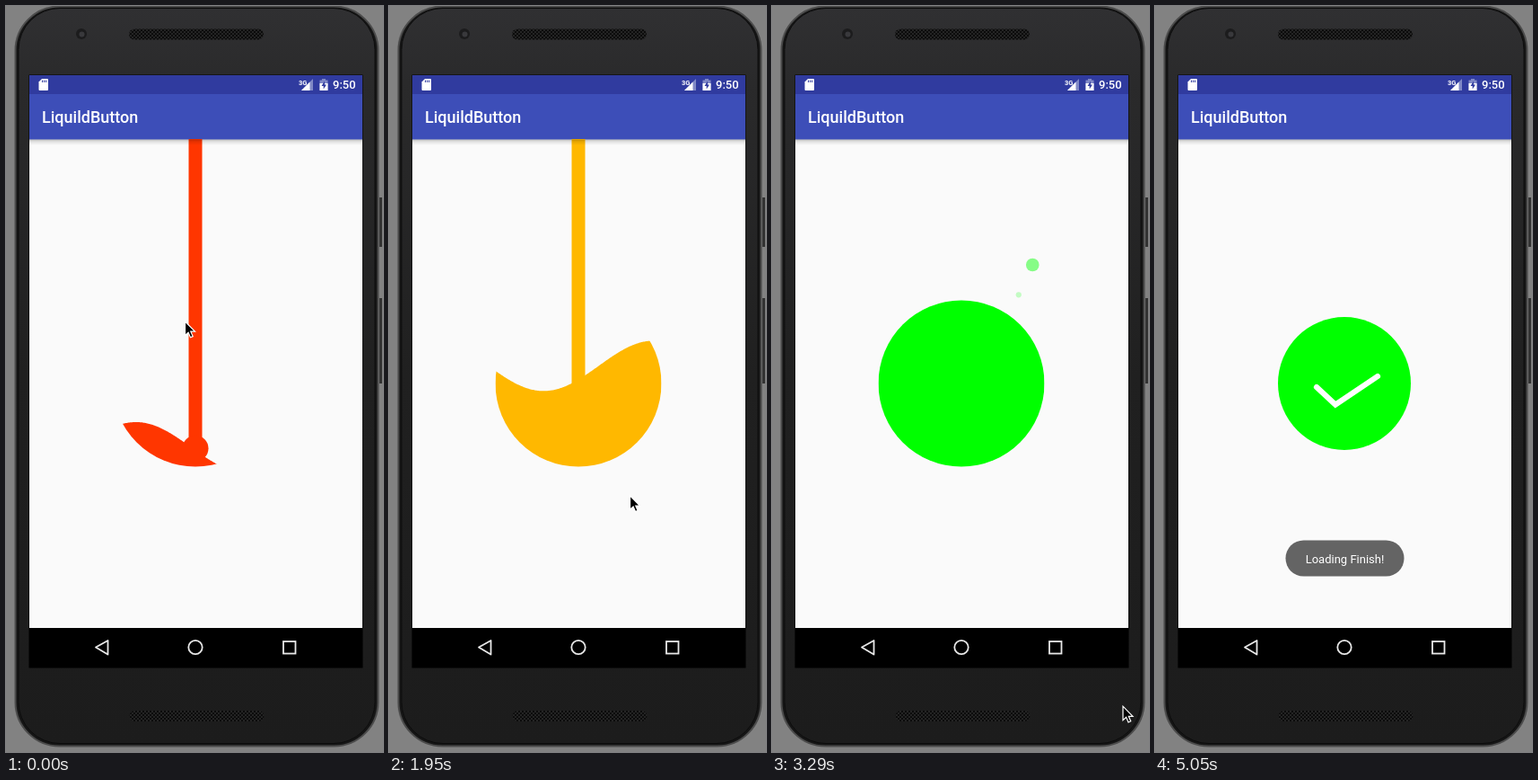
Animation of 420 by 830 pixels, one loop 6.14 s. Source, as an HTML page with a canvas:

```html
<!DOCTYPE html>
<html>
<head>
<meta charset="utf-8">
<style>
html, body { margin: 0; width: 420px; height: 830px; overflow: hidden; background: #828282; }
svg, canvas { position: absolute; left: 0; top: 0; }
text { font-family: Roboto, sans-serif; fill: #fff; }
</style>
</head>
<body>
<svg width="420" height="830">
  <defs>
    <linearGradient id="body" x2="0" y2="1">
      <stop offset="0" stop-color="#303032"/>
      <stop offset=".1" stop-color="#2a2a2b"/>
      <stop offset=".5" stop-color="#202020"/>
      <stop offset="1" stop-color="#1c1c1c"/>
    </linearGradient>
    <pattern id="mesh" width="4" height="4" patternUnits="userSpaceOnUse">
      <rect width="4" height="4" fill="#242424"/>
      <circle cx="1" cy="1" r="1.1" fill="#080808"/>
      <circle cx="3" cy="3" r="1.1" fill="#080808"/>
    </pattern>
  </defs>

  <path d="M417.5 213V268M417.5 325V420" stroke="#333" stroke-width="3"/>
  <rect x="10.5" y=".5" width="404" height="823" rx="49" fill="#161616" stroke="#4c4c4c" stroke-width="2"/>
  <rect x="14" y="2.5" width="397" height="818" rx="46" fill="url(#body)" stroke="#0c0c0c"/>
  <circle cx="84" cy="31" r="6" fill="#1c1c1d"/>
  <circle cx="84.5" cy="31.5" r="3" fill="#39393c"/>
  <rect x="137" y="25.5" width="150" height="12" rx="6" fill="url(#mesh)"/>
  <rect x="137.5" y="784" width="150" height="12" rx="6" fill="url(#mesh)"/>

  <rect x="25.5" y="76.5" width="372" height="660"/>
  <rect x="26" y="148" width="371" height="544" fill="#fafafa"/>
  <rect x="26" y="77" width="371" height="21" fill="#303b9f"/>
  <rect x="26" y="98" width="371" height="50.5" fill="#3d4eb8"/>
  <text x="40" y="130" font-size="18" font-weight="500">LiquildButton</text>

  <path d="M40 81H46Q47 81 47 82V93Q47 94 46 94H37.500Q36.500 94 36.500 93V84.500Z" fill="#fff"/>
  <path d="M40.500 82.500v2.500M42.500 82.500v2.500M44.500 82.500v2.500" stroke="#303b9f"/>
  <text x="326" y="87.500" font-size="7.500" font-weight="700">3G</text>
  <path d="M329 94L342 81V94Z" fill="#8089c6"/>
  <path d="M329 94L338.500 84.500V94Z" fill="#fff"/>
  <path d="M349.500 82.500H352V81H356V82.500H358.500V94H349.500Z" fill="#8089c6"/>
  <path d="M349.500 86H358.500V94H349.500Z" fill="#fff"/>
  <path d="M355 83.500L351.500 89H353.700V92.500L357 87.500H355Z" fill="#303b9f"/>
  <text x="364" y="92" font-size="13" font-weight="500">9:50</text>

  <g fill="none" stroke="#e8e8e8" stroke-width="1.800">
    <path d="M100 713.500L113.500 706V721.500Z" stroke-linejoin="round"/>
    <circle cx="211" cy="713.500" r="7.700"/>
    <rect x="309" y="707" width="13.500" height="13.500"/>
  </g>

  <g id="toast" opacity="0">
    <rect x="145.500" y="594.500" width="132" height="40" rx="20" fill="#646464"/>
    <text x="211.500" y="620" font-size="13" text-anchor="middle">Loading Finish!</text>
  </g>
</svg>
<canvas id="stage" width="420" height="830"></canvas>

<script>
const LOOP = 6140, CX = 211, CY = 420, FULL = 92.5, SMALL = 74;
const ctx = document.getElementById('stage').getContext('2d');
const toast = document.getElementById('toast');
const clamp = v => Math.min(1, Math.max(0, v));
const ramp = (t, a, b) => clamp((t - a) / (b - a));

// Linear interpolation through rows of [time, value, ...]
function track(rows, t) {
  let i = 1;
  while (i < rows.length - 1 && rows[i][0] < t) i++;
  const a = rows[i - 1], b = rows[i], k = ramp(t, a[0], b[0]);
  return a.slice(1).map((v, j) => v + (b[j + 1] - v) * k);
}

const pointerPath = [
  [100, 199.5, 351], [650, 226, 396], [1260, 257, 504.5], [2040, 270, 550],
  [2580, 273, 558], [2670, 324, 628], [2900, 391, 779], [3290, 391, 779],
  [3720, 391.5, 826], [3900, 391.5, 832]
];
// start time, x, y, horizontal speed, upward speed, radius
const bubbles = [
  [1980, 187, 400, -.05, .23, 8],
  [2630, 228.5, 348, .07, .23, 3.6],
  [2950, 266.4, 333.7, .07, .232, 7.6],
  [3300, 271.6, 342, .0355, .262, 14.5],
  [3320, 270, 329, .06, .262, 3.7],
  [3470, 221.5, 345.5, 0, .23, 2.5],
  [3400, 157, 350, -.05, .23, 2]
];

const level = t => 491 - .03626 * t - 5.23e-6 * t * t;

function disc(x, y, r) {
  ctx.beginPath();
  ctx.arc(x, y, r, 0, 7);
  ctx.fill();
}

function liquidColor(t) {
  const early = (528.6 - level(Math.min(t, 2580))) / 355;
  const u = t < 2580 ? early : track([[2580, early], [3030, .86], [3190, 1]], t)[0];
  const channel = v => Math.round(255 * clamp(v));
  return `rgb(${channel(2 - 2 * u)},${channel(2 * u)},0)`;
}

function drawBubbles(t) {
  const life = 800;
  for (const [start, x, y, vx, vy, r] of bubbles) {
    const age = t - start, q = age / life;
    if (q < 0 || q > 1) continue;
    ctx.globalAlpha = .5 * (1 - q ** 3);
    disc(x + vx * age, y - vy * age + 2.87e-4 * age * age, r * (1 - .2 * q * q));
  }
  ctx.globalAlpha = 1;
}

function drawLiquid(t) {
  const crest = 145 - .2161 * t + 2.097e-5 * t * t;
  const amp = track([[2580, 28], [3030, 11], [3300, 0]], t)[0];
  const surface = x => level(t) - amp * Math.cos((x - crest) * 2 * Math.PI / 246);

  const top = 148 + 182 * ramp(t, 3050, 3270) ** 2;
  const end = Math.max(surface(CX) + 10, 335);
  if (top < 330) ctx.fillRect(203.5, top, 15, end - top);

  ctx.save();
  ctx.beginPath();
  ctx.arc(CX, CY, FULL, 0, 7);
  ctx.clip();
  if (t < 400) disc(CX, 492 + .25 * t, 14.5);
  ctx.beginPath();
  ctx.moveTo(CX - FULL, 520);
  for (let x = CX - FULL; x <= CX + FULL; x++) ctx.lineTo(x, surface(x));
  ctx.lineTo(CX + FULL, 520);
  ctx.fill();
  ctx.restore();
}

function drawCheck(t) {
  const p = ramp(t, 3305, 4045);
  const r = FULL - (FULL - SMALL) * p ** 3.4;
  disc(CX, CY, r);
  const first = 28.7, second = 56.5, len = p * (first + second);
  const a = clamp(len / first), b = clamp((len - first) / second);
  ctx.save();
  ctx.translate(CX, CY);
  ctx.scale(r / SMALL, r / SMALL);
  ctx.beginPath();
  ctx.moveTo(-31, 4);
  ctx.lineTo(-31 + 21 * a, 4 + 19.5 * a);
  if (b > 0) ctx.lineTo(-10 + 47 * b, 23.5 - 31.5 * b);
  ctx.lineWidth = 6.2;
  ctx.lineCap = 'round';
  ctx.strokeStyle = '#fff';
  if (p > 0) ctx.stroke();
  ctx.restore();
}

function drawShadow() {
  const g = ctx.createLinearGradient(0, 148, 0, 155);
  g.addColorStop(0, 'rgba(0,0,0,.28)');
  g.addColorStop(.4, 'rgba(0,0,0,.1)');
  g.addColorStop(1, 'rgba(0,0,0,0)');
  ctx.fillStyle = g;
  ctx.fillRect(26, 148.5, 371, 7);
}

const arrow = new Path2D('M0 0V15.500L3.600 12.200L6 17.800L8.700 16.600L6.300 11.200H11Z');
function drawPointer(t) {
  if (t > 3900) return;
  ctx.save();
  ctx.translate(...track(pointerPath, t));
  ctx.fillStyle = '#000';
  ctx.strokeStyle = '#fff';
  ctx.lineWidth = 1.2;
  ctx.fill(arrow);
  ctx.stroke(arrow);
  ctx.restore();
}

function draw(now) {
  const t = now % LOOP;
  ctx.clearRect(0, 0, 420, 830);
  ctx.fillStyle = liquidColor(t);
  drawBubbles(t);
  if (t < 3305) drawLiquid(t);
  else drawCheck(t);
  drawShadow();
  drawPointer(t);
  toast.setAttribute('opacity', ramp(t, 4540, 4870));
  requestAnimationFrame(draw);
}
draw(0);
</script>
</body>
</html>
```
